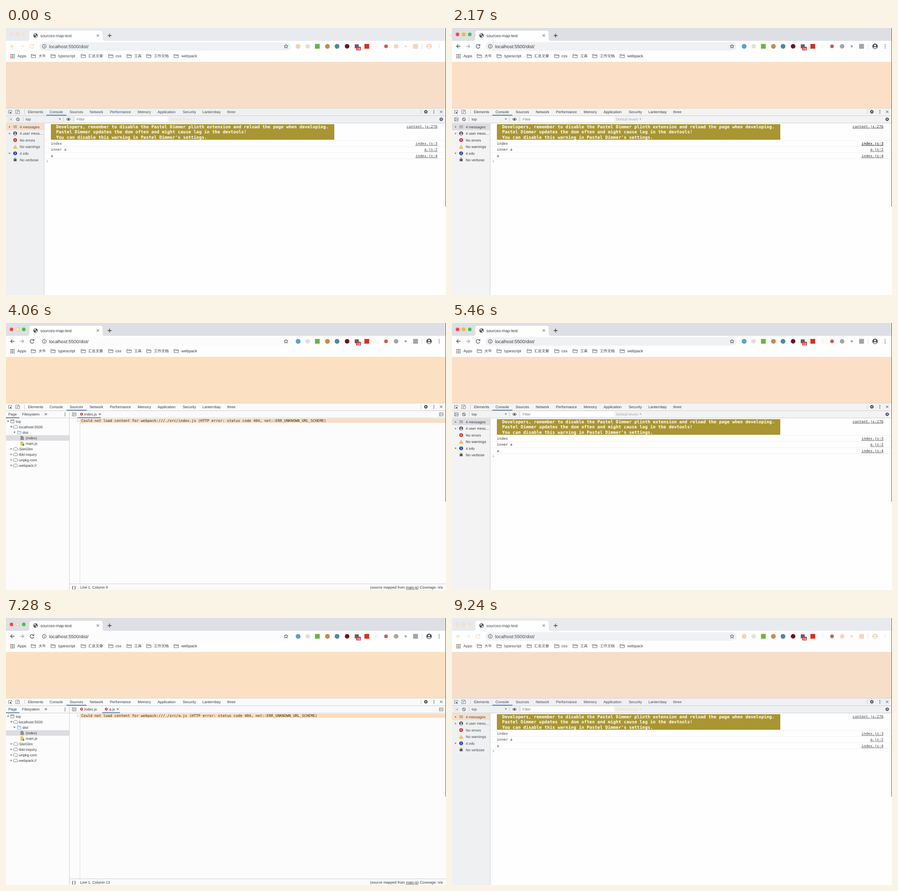
Write an HTML page that moves like this. It is 961x583 px and loops after 9380 ms.

```html
<!DOCTYPE html>
<html lang="en">
<head>
<meta charset="utf-8">
<title>sources-map-test</title>
<style>
  html, body { margin: 0; width: 100%; height: 100%; overflow: hidden; background: #fefefe; }
  svg {
    display: block; width: 961px; height: 583px;
    --frame: #dedfe4; --bar: #f3f3f3; --page: #fbdfc7; --row: #dddde1; --field: #eff1f3;
    --ctl: #55585c; --dim: #aaa; --mark: #a5a5a5; --blue: #5d9fd0;
    --red: #ed4e48; --amber: #f2b93b; --green: #45c14b; --ink: #36393d;
  }
  svg.sources { --page: #fbe0c2; --bar: #fafafa; --field: #fcfcfc; --amber: #f5ead2; }
  svg.idle {
    --frame: #e8eaed; --bar: #eef0f2; --page: #f7dec8; --row: #f7dec8;
    --ctl: #f7d6b8; --dim: #f7d6b8; --mark: #f7d6b8; --blue: #f2d3b0;
    --red: #f1e3d8; --amber: #f1e3d8; --green: #f1e3d8; --ink: #44474b;
  }
  text {
    font: 8px "Liberation Sans", Arial, sans-serif; fill: var(--ink);
    white-space: pre; text-rendering: geometricPrecision;
  }
  .cjk { font: 8.1px "Noto Sans CJK SC", "Noto Sans CJK", sans-serif; }
  .mono { font: 8px "DejaVu Sans Mono", monospace; }
  .banner { font: bold 9.6px "DejaVu Sans Mono", monospace; fill: #fff; }
  .link { text-decoration: underline; text-anchor: end; }
  .link.hover { fill: #000; }
  .end { text-anchor: end; }
  .line { fill: none; stroke: var(--ink); stroke-width: 1; }
  .thin { fill: none; stroke: #6a6a6a; stroke-width: .8; }
  .ctl { fill: none; stroke: var(--ctl); stroke-width: 1.3; }
  .light { stroke: #e9b45a; stroke-width: .7; }
  .idle .light { stroke: #f3d3b5; }
  .slider { fill: #4772a5; }
</style>
</head>
<body>
<svg id="stage" viewBox="0 0 961 583"></svg>
<script>
const LOOP = 9380;
const SLIDE = 150;

// [start ms, panel, window focused]
const STEPS = [
  [0, 'console', false],
  [1540, 'console', true],
  [2520, 'index', true],
  [4760, 'console', true],
  [5970, 'a', true],
  [8035, 'console', true],
  [8820, 'console', false],
];

const text = (x, y, s, attrs = '') => `<text x="${x}" y="${y}" ${attrs}>${s}</text>`;
const rect = (x, y, w, h, fill, attrs = '') =>
  `<rect x="${x}" y="${y}" width="${w}" height="${h}" fill="${fill}" ${attrs}/>`;
const dot = (x, y, r, fill, attrs = '') => `<circle cx="${x}" cy="${y}" r="${r}" fill="${fill}" ${attrs}/>`;
const path = (d, cls = 'line', attrs = '') => `<path d="${d}" class="${cls}" ${attrs}/>`;
const cross = (x, y, r, cls, attrs) =>
  path(`M${x - r} ${y - r}l${2 * r} ${2 * r}m0 ${-2 * r}l${-2 * r} ${2 * r}`, cls, attrs);
const dots = (x, y, gap, fill) => [-gap, 0, gap].map(d => dot(x, y + d, 0.9, fill)).join('');
const arrow = (x, y, open) =>
  `<path d="${open ? `M${x - 2.2} ${y - 1.5}h4.4l-2.2 3.3z` : `M${x - 1.4} ${y - 2}v4l3-2z`}" fill="#6e6e6e"/>`;
const gear = (x, y) =>
  `<circle cx="${x}" cy="${y}" r="2.3" class="line" style="stroke-width:1.7"/>` +
  `<circle cx="${x}" cy="${y}" r="3.6" class="line" stroke-dasharray="1.5 1.33"/>`;
const folder = (x, y, w = 9.7, color = '#5f6368') =>
  `<path d="M${x} ${y}h3.3l1.2 1.3h${w - 4.5}v6h${-w}zM${x} ${y + 2.6}h${w}" fill="none" stroke="${color}" stroke-width=".9"/>`;
const person = (x, y, r, fill, inner) => dot(x, y, r, fill) + dot(x, y - r * .3, r * .32, inner) +
  `<ellipse cx="${x}" cy="${y + r * .5}" rx="${r * .58}" ry="${r * .27}" fill="${inner}"/>`;
const cloud = (x, y) =>
  path(`M${x - 3} ${y + 3}h6.2a2 2 0 0 0 .2-4a3.3 3.3 0 0 0-6.2-.8a2.4 2.4 0 0 0-.2 4.8z`, 'thin');
const errorDot = (x, y, r) => dot(x, y, r, '#d32f35') + cross(x, y, r * .35, 'line', 'style="stroke:#fff"');
const dockIcon = (x, y, cls) => path(`M${x - 4} ${y - 3.5}h8v7h-8zM${x - 1.8} ${y - 3.5}v7`, cls, 'style="stroke-width:.8"') +
  `<path d="M${x + 2.3} ${y - 1.8}v3.6l-2.7-1.8z" fill="#777"/>`;

function browserFrame() {
  const lights = ['red', 'amber', 'green']
    .map((c, i) => dot(12 + 13.4 * i, 14, 3.9, `var(--${c})`, c === 'amber' ? 'class="light"' : '')).join('');
  const marks = [
    ['c', 638, 5.3, 'var(--blue)'], ['c', 659, 5, '#e4dfda'], ['s', 680, 5.2, '#6cb43f'],
    ['c', 702, 5.2, '#ca8a4c'], ['c', 723, 5.2, '#4f88a0'], ['c', 745, 5, '#70141c'],
    ['s', 766, 4.3, '#5c6068'], ['s', 788, 5.2, '#d8301c'], ['s', 809, 4.5, '#f8f8f8'],
    ['c', 830, 4, '#cf5b4c'], ['c', 852, 5, 'var(--mark)'], ['c', 873, 2.4, 'var(--mark)'],
    ['s', 894.5, 5.3, 'var(--mark)'],
  ].map(([kind, x, r, fill]) => kind === 'c'
    ? dot(x, 40, r, fill) : rect(x - r, 40 - r, 2 * r, 2 * r, fill)).join('');
  const bookmarks = [
    [55, 71, '大牛', 1], [98, 114, 'typescript'], [164, 179.5, '汇总文章', 1], [224, 239, 'css'],
    [264, 280, '工具', 1], [307, 323, '工作文档', 1], [367, 383, 'webpack'],
  ].map(([fx, x, label, cjk]) => folder(fx, 57.5) +
    text(x, 64, label, cjk ? 'class="cjk"' : 'style="font-size:8.7px"')).join('');
  let grid = '';
  for (let i = 0; i < 9; i++)
    grid += rect(9.5 + i % 3 * 3.5, 57 + (i / 3 | 0) * 3.5, 2.2, 2.2,
      ['#d8473b', '#58606a', '#3f8f55'][i % 3]);

  return rect(0, 0, 961, 29, 'var(--frame)') + rect(0, 28, 961, 46, '#fefefe') + lights +
    `<path d="M46 28q5 0 5-5V11q0-5 5-5h150q5 0 5 5v12q0 5 5 5z" fill="#fefefe"/>` +
    dot(64.5, 16.5, 4.8, '#505458') +
    `<path d="M61 14.5l3-1.5 1.5 1.5-2 2zM65 17.5l3-1-1 3.5-2 .5z" fill="#fefefe"/>` +
    text(75, 19.6, 'sources-map-test', 'style="font-size:8.9px"') +
    cross(200.5, 16.5, 2.5, 'line') +
    path('M222 16.5h8.6m-4.3-4.3v8.6', 'line', 'style="stroke-width:1.3"') +
    path('M18.5 40h-8.5m4-4l-4 4 4 4', 'ctl') +
    path('M30.5 40h8.5m-4-4l4 4-4 4', 'ctl', 'opacity=".5"') +
    path('M60 37.2a4.2 4.2 0 1 0 .9 4M61 35.2v3.2h-3.2', 'ctl') +
    rect(73, 31, 549, 18.5, 'var(--field)', 'rx="9.2"') +
    `<circle cx="83.5" cy="40" r="4.1" class="line"/>` + path('M83.5 39.3v3m0-4.6v1') +
    text(94, 43.5, 'localhost:5500/dist/', 'style="font-size:10.1px"') +
    path('M611.5 35.8l1.3 2.8 3 .3-2.3 2 .7 3-2.7-1.6-2.7 1.6.7-3-2.3-2 3-.3z') +
    marks + rect(765, 41, 10, 8, '#d22b32', 'rx="1"') +
    text(770, 47.7, '16', 'text-anchor="middle" style="font-size:7px;font-weight:bold;fill:#fff"') +
    path('M908.5 34v12', 'line', 'style="stroke:#dadce0"') +
    person(924, 40, 6, 'var(--ctl)', '#fefefe') + dots(946, 40, 3.5, 'var(--ctl)') +
    grid + text(25, 64, 'Apps', 'style="font-size:8.5px"') + bookmarks +
    rect(0, 74, 961, 101, 'var(--page)');
}

function toolsFrame() {
  const tabs = [
    [48, 'Elements'], [95, 'Console'], [139, 'Sources'], [183, 'Network'], [227, 'Performance'],
    [287.5, 'Memory'], [331, 'Application'], [386, 'Security'], [429, 'Lanternbay'], [483, 'three'],
  ].map(([x, label]) => text(x, 185.5, label)).join('');
  return rect(0, 174.5, 961, 33, 'var(--bar)') +
    rect(0, 174.5, 961, 1, '#cfcfcf') + rect(0, 191, 961, 1, '#cfcfcf') +
    rect(0, 207, 961, 1, '#d0d0d0') +
    path('M8 186.5h-2.5v-6.5h7v3', 'thin') + '<path d="M8.5 182.5l4.3 2.6-1.9.4 1.3 2-.9.5-1.2-2-1.3 1.3z" fill="#555"/>' +
    path('M23.5 187h-2.5v-8h7.5v2M24.5 181.5h5v5.5h-5z', 'thin') +
    rect(40, 178, 1, 10, '#ccc') + rect(906, 178, 1, 10, '#ccc') + tabs +
    gear(917, 183) + dots(934.5, 183, 3, '#555') + cross(950.5, 183, 2.6, 'line');
}

function consolePanel() {
  const side = [
    ['4 messages', path('M16 213.5h8m-8 2.2h8m-8 2.2h8', 'thin'), 1],
    ['4 user mess…', person(20, 230.3, 4.2, '#484b50', '#fff'), 1],
    ['No errors', errorDot(20, 244.8, 4.1)],
    ['No warnings', '<path d="M20 254.7l4.7 8.6h-9.4z" fill="#e9b93c"/>' + rect(19.5, 257.5, 1, 3, '#fff')],
    ['4 info', dot(20, 273.6, 4.2, '#2d3aa0') + rect(19.4, 272.6, 1.2, 3.6, '#fff') + dot(20, 271.2, .7, '#fff'), 1],
    ['No verbose', dot(20, 288.2, 2.8, '#444') + path('M16 286h8m-8 2.2h8m-8 2.2h8M18 284h4', 'thin')],
  ].map(([label, icon, branch], i) => {
    const y = 216 + 14.4 * i;
    return icon + text(30, y + 2.9, label) + (branch ? arrow(8, y, false) : '');
  }).join('');
  const banner = [
    'Developers, remember to disable the Pastel Dimmer plinth extension and reload the page when developing.',
    'Pastel Dimmer updates the dom often and might cause lag in the devtools!',
    "You can disable this warning in Pastel Dimmer's settings.",
  ].map((s, i) => text(109.5, 219 + 11.3 * i, s, 'class="banner"')).join('');
  const logs = [['index', 'index.js:3'], ['inner a', 'a.js:2'], ['a', 'index.js:4']]
    .map(([msg, src], i) => {
      const y = 255 + 13.4 * i;
      return text(98, y, msg, 'class="mono"') + rect(84, y + 3.2, 876, 1, '#f0f0f0') +
        text(942.3, y, src, `class="mono link"${i ? '' : ' id="hoverLink"'}`);
    }).join('');

  return rect(0, 208, 961, 375, '#fefefe') + rect(0, 208, 83, 375, 'var(--bar)') +
    rect(83, 208, 1, 375, '#d0d0d0') + rect(0, 209, 83, 14, 'var(--row)') + side +
    dockIcon(9.5, 199.5, 'ctl') +
    `<circle cx="26" cy="199.5" r="3.3" class="line"/>` + path('M23.7 197.2l4.6 4.6') +
    rect(37, 194, 1, 10, '#ccc') + text(43, 201.8, 'top') + arrow(117.5, 199, true) +
    rect(125, 194, 1, 10, '#ccc') +
    path('M132 199.3q4.5-5 9 0q-4.5 5-9 0z') + dot(136.5, 199.3, 1.6, '#444') +
    rect(147, 194, 1, 10, '#ccc') + rect(151, 193, 203, 12.5, '#fefefe') +
    text(154, 202, 'Filter', 'style="fill:#777"') +
    text(358.5, 201.5, 'Default levels', 'style="fill:var(--dim)"') +
    '<path d="M409.5 197.5h4.2l-2.1 3.4z" fill="var(--dim)"/>' + gear(950.5, 199.3) +
    rect(98, 210, 619, 34, '#a99532') + banner +
    text(942.3, 217.5, 'content.js:276', 'class="mono link"') + rect(84, 245, 876, 1, '#f0f0f0') + logs +
    path('M89 288.5l2.5 2.3-2.5 2.3', 'thin') +
    rect(98, 286, 1, 8, '#222', 'id="caret"');
}

function sourcesPanel() {
  const page = (x, y, fill) =>
    `<path d="M${x - 3.5} ${y - 4.5}h4.5l3 3v6h-7.5z" fill="${fill}"/>`;
  const tree = [
    [4.5, 21.5, 'top', y => path(`M10.5 ${y - 3.5}h7v7h-7zM10.5 ${y - 2}h7`, 'thin'), true],
    [11.5, 28.5, 'localhost:5500', y => cloud(21, y), true],
    [18.5, 36, 'dist', y => folder(25, y - 3.5, 7.8, '#6aa3d8'), true],
    [0, 43, '(index)', y => page(35, y, '#909090')],
    [0, 43, 'main.js', y => page(35, y, '#e3c765') + dot(38, y + 3, 2, '#35a244')],
    [11.5, 28.5, 'SiteGlim', y => cloud(21, y), false],
    [11.5, 28.5, 'tbkl-inquiry', y => cloud(21, y), false],
    [11.5, 28.5, 'unpkg.com', y => cloud(21, y), false],
    [11.5, 28.5, 'webpack://', y => cloud(21, y), false],
  ].map(([ax, x, label, icon, open], i) => {
    const y = 214.8 + 12.03 * i;
    return (ax ? arrow(ax, y, open) : '') + icon(y) + text(x, y + 2.9, label);
  }).join('');

  return rect(0, 208, 961, 375, '#fcfcfc') + rect(138, 192, 1, 391, '#cfcfcf') +
    rect(0, 245, 138, 12, 'var(--row)') + tree +
    text(5, 201.8, 'Page') + text(35, 201.8, 'Filesystem') + text(84, 202, '»', 'style="font-size:11px"') +
    dots(129, 199.5, 3, '#555') + rect(0, 206, 29, 1.6, '', 'class="slider"') +
    dockIcon(149, 199.5, 'thin') + dockIcon(950.5, 199.5, 'thin') +
    errorDot(165, 199, 3) + text(171, 201.8, 'index.js') +
    `<g id="indexClose">${cross(205, 199, 1.9, 'line')}</g>` +
    `<g id="secondTab">${errorDot(219, 199, 3) + text(225.5, 201.8, 'a.js') + cross(243.7, 199, 1.9, 'line')}</g>` +
    rect(0, 206, 51, 1.6, '', 'class="slider" id="fileSlider"') +
    rect(161, 208, 1, 361, '#dcdcdc') +
    rect(162, 209, 798, 8.8, '#fbdcc0') + text(159, 216.2, '1', 'class="mono end" style="fill:#b5b5b5"') +
    text(164.5, 216.2, '', 'class="mono" id="code" style="fill:#333311"') +
    rect(139, 569, 822, 14, 'var(--bar)') + rect(139, 569, 822, 1, '#cfcfcf') +
    text(144, 579.8, '{ }', 'style="font-weight:bold"') + text(162, 579.8, '', 'id="position"') +
    text(954, 579.8, '(source mapped from <tspan text-decoration="underline">main.js</tspan>) Coverage: n/a', 'class="end"');
}

const stage = document.getElementById('stage');
stage.innerHTML = browserFrame() + toolsFrame() +
  `<g id="consolePanel">${consolePanel()}</g><g id="sourcesPanel">${sourcesPanel()}</g>` +
  rect(0, 189.6, 44, 1.7, '', 'class="slider" id="tabSlider"') + rect(960, 0, 1, 390, '#555');
const el = id => document.getElementById(id);
const show = (id, on) => el(id).setAttribute('display', on ? 'inline' : 'none');

// cubic-bezier(0, 0, .2, 1)
function ease(p) {
  if (p >= 1) return 1;
  let lo = 0, hi = 1;
  for (let i = 0; i < 20; i++) {
    const s = (lo + hi) / 2;
    if (0.6 * s * s * (1 - s) + s ** 3 < p) lo = s; else hi = s;
  }
  return 3 * lo * lo - 2 * lo ** 3;
}

const tabX = panel => panel === 'console' ? 88 : 132;

function render(t) {
  let i = STEPS.length - 1;
  while (STEPS[i][0] > t) i--;
  const [start, panel, focused] = STEPS[i];
  const previous = i ? STEPS[i - 1][1] : panel;
  const inConsole = panel === 'console';
  const second = panel === 'a';
  const k = ease((t - start) / SLIDE);

  stage.classList.toggle('idle', !focused);
  stage.classList.toggle('sources', !inConsole);
  show('consolePanel', inConsole);
  show('sourcesPanel', !inConsole);
  el('tabSlider').setAttribute('x', tabX(previous) + (tabX(panel) - tabX(previous)) * k);

  el('hoverLink').classList.toggle('hover', t > 2100 && t < 2520);
  show('caret', focused && previous !== 'console' && (t - start) % 1000 < 435);

  show('indexClose', !second);
  show('secondTab', second);
  el('fileSlider').setAttribute('x', second ? 156 + 54 * k : 156);
  el('fileSlider').setAttribute('width', second ? 39 : 51);
  el('code').textContent = `Could not load content for webpack:///./src/${second ? 'a' : 'index'}.js ` +
    '(HTTP error: status code 404, net::ERR_UNKNOWN_URL_SCHEME)';
  el('position').textContent = `Line 1, Column ${second ? 13 : 9}`;
}

const began = performance.now();
function tick() {
  render((performance.now() - began) % LOOP);
  requestAnimationFrame(tick);
}
tick();
</script>
</body>
</html>
```
